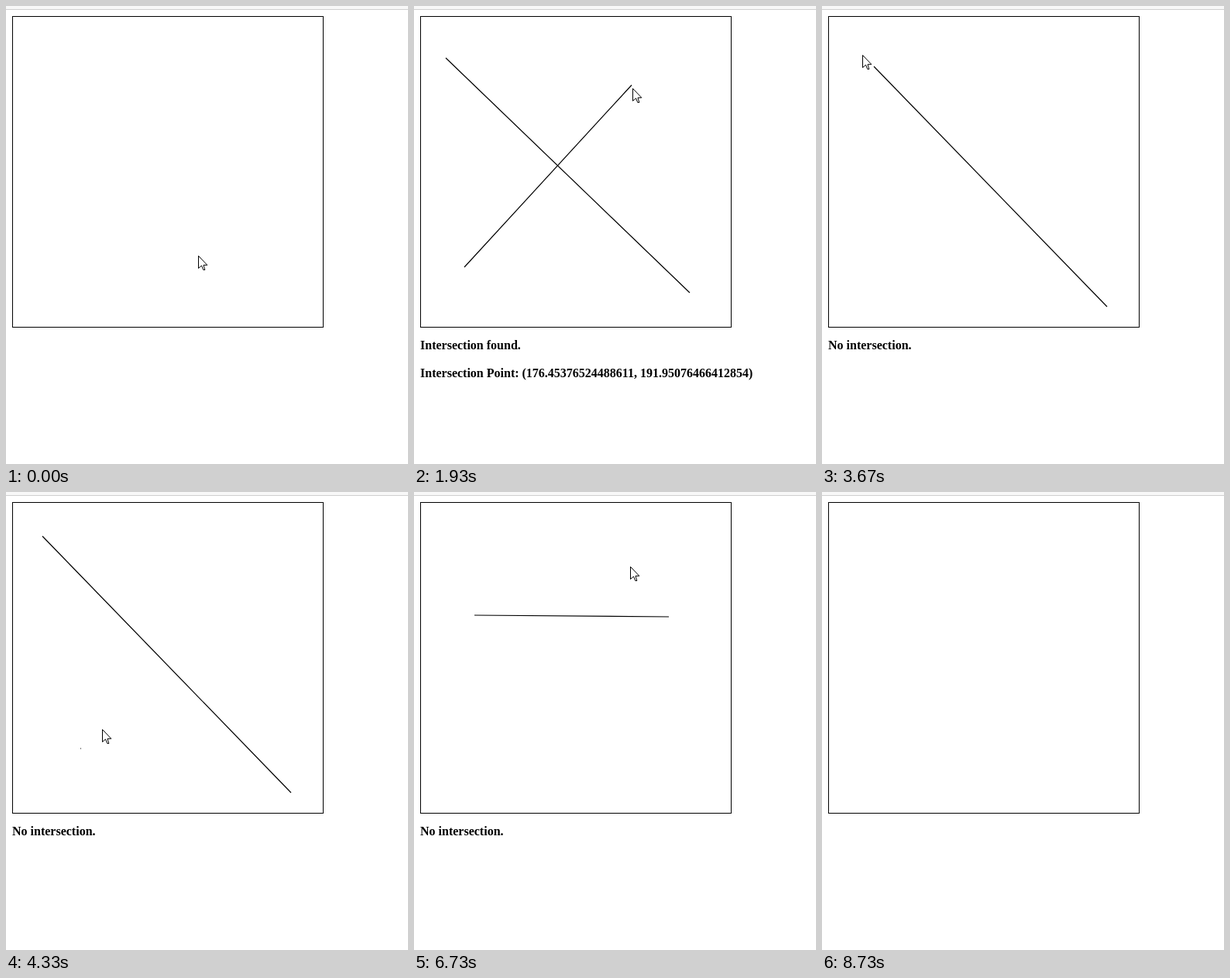
Animation, 519 px wide and 591 px high, one loop 9.07 s. Source, as an HTML page:

```html
<!DOCTYPE html>
<html lang="en">
<head>
<meta charset="utf-8">
<title>Line intersection</title>
<style>
  html, body { margin: 0; width: 100%; height: 100%; overflow: hidden; background: #fff; }
  svg { display: block; }
  text { font: bold 16px "Liberation Serif", "Times New Roman", serif; }
</style>
</head>
<body>
<svg width="519" height="591" viewBox="0 0 519 591">
  <rect width="519" height="4" fill="#f8f8f8"/>
  <rect y="4" width="519" height="1" fill="#cfcfcf"/>
  <rect x="8.5" y="13.5" width="401" height="401" fill="none" stroke="#000"/>
  <path id="lines" fill="none" stroke="#000" stroke-width="1.2"/>
  <text id="status" x="8" y="443"></text>
  <text id="point" x="8" y="479"></text>
  <path id="cursor" d="M.5 .5V16.5L4.5 13L6.8 18.5H8.8L7 12.3H11.8Z" fill="#fff" stroke="#000"/>
</svg>
<script>
const LOOP = 9070, STEP = 1000 / 15, APPROACH = 6;
const $ = id => document.getElementById(id);
const drag = (start, end, a, b) => ({ start, end, a, b });

// Two drags per round, then the pointer leaves for a resting place; times in steps
const rounds = [
  { drags: [drag(4, 11, [356, 370], [41, 67]), drag(18, 24, [65, 337], [281, 102])],
    rest: drag(28, 42, [281, 102], [363, 394]), clear: 42 },
  { drags: [drag(43, 56, [368, 388], [47, 57]), drag(64, 68.5, [96, 331], [314, 136])],
    rest: drag(69, 72, [314, 136], [335, 324]), clear: 75 },
  { drags: [drag(90, 96, [78, 159], [329, 161]), drag(102, 110, [275, 91], [165, 290])],
    rest: drag(122, 131, [165, 290], [215, 600]), clear: 123 }
];
const moves = rounds.flatMap(r => [...r.drags, r.rest]);
const home = { end: 0, b: [248, 322] };

function along({ start, end, a, b }, n) {
  const u = Math.min(1, Math.max(0, (n - start) / (end - start)));
  const k = u * u * (3 - 2 * u);
  return a.map((v, i) => Math.round(v + (b[i] - v) * k));
}

// Follow the current move, or glide from its end to where the next begins
function pointer(n) {
  const i = moves.findIndex(m => n < m.end);
  if (i < 0) return moves[moves.length - 1].b;
  const move = moves[i], last = moves[i - 1] || home;
  if (n >= move.start) return along(move, n);
  const leave = Math.max(last.end, move.start - APPROACH);
  return along(drag(leave, move.start, last.b, move.a), n);
}

function intersect([[ax, ay], [bx, by]], [[cx, cy], [dx, dy]]) {
  const rx = bx - ax, ry = by - ay, sx = dx - cx, sy = dy - cy;
  const det = rx * sy - ry * sx;
  if (!det) return null;
  const t = ((cx - ax) * sy - (cy - ay) * sx) / det;
  const u = ((cx - ax) * ry - (cy - ay) * rx) / det;
  return t >= 0 && t <= 1 && u >= 0 && u <= 1 ? [ax + t * rx, ay + t * ry] : null;
}

function linePath([p, q]) {
  return `M${p}` + (`${p}` === `${q}` ? "h1" : `L${q}`);
}

function render(ms) {
  const n = Math.floor((ms % LOOP + 4) / STEP);
  const round = rounds.find(r => n < r.clear);
  // The page draws one step behind the pointer
  const segs = round ? round.drags.filter(d => n > d.start).map(d => [d.a, along(d, n - 1)]) : [];
  const hit = segs.length === 2 && intersect(...segs);

  $("lines").setAttribute("d", segs.map(linePath).join(""));
  $("status").textContent = hit ? "Intersection found." : segs.length ? "No intersection." : "";
  $("point").textContent = hit
    ? `Intersection Point: (${(hit[0] - 9).toFixed(14)}, ${(hit[1] - 14).toFixed(14)})`
    : "";
  $("cursor").setAttribute("transform", `translate(${pointer(n)})`);
}

const began = performance.now();
function tick() {
  render(performance.now() - began);
  requestAnimationFrame(tick);
}
tick();
</script>
</body>
</html>
```
